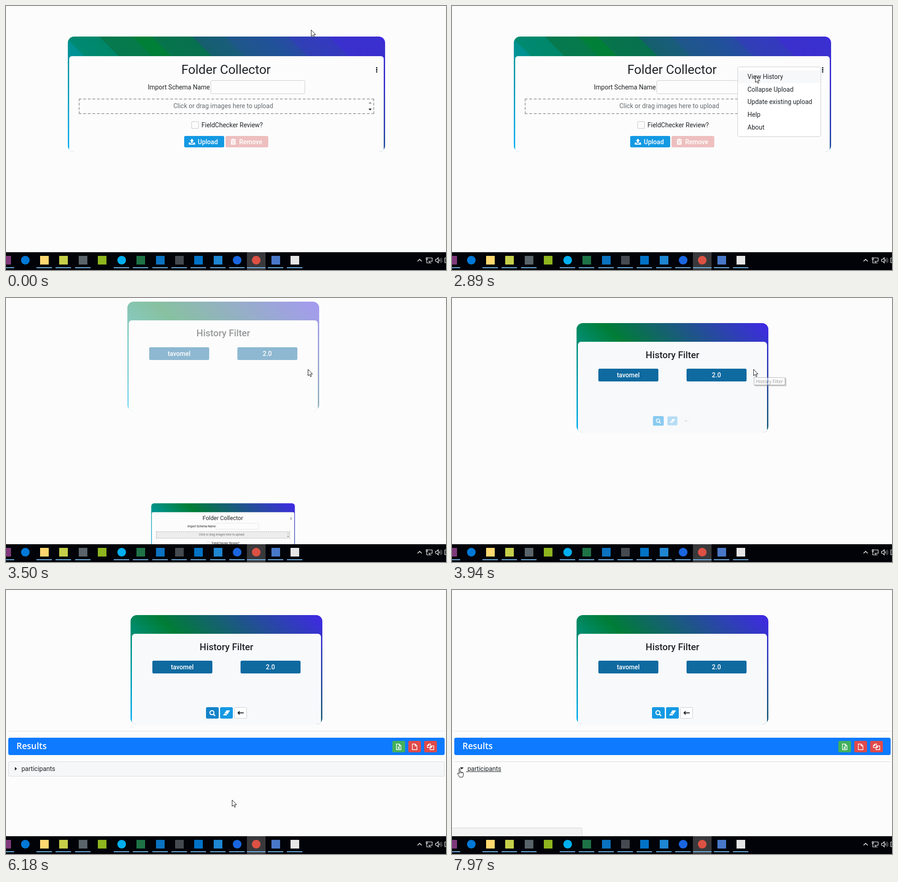
These frames come from a looping animation (968x579 px, 8 s). An HTML page:

```html
<!DOCTYPE html>
<html lang="en">
<head>
<meta charset="utf-8">
<title>Upload history</title>
<style>
html, body { margin: 0; width: 100%; height: 100%; overflow: hidden; background: #fcfcfc; }
#stage { position: absolute; left: 0; top: 0; width: 968px; height: 579px; overflow: hidden;
  background: #fcfcfc; color: #212529; font: 14px Roboto, sans-serif; }
#stage div, #stage svg { position: absolute; box-sizing: border-box; }
.text { white-space: pre; }
.layer { left: 0; top: 0; width: 968px; height: 579px; }
.card { border-radius: 14px; overflow: hidden;
  background: linear-gradient(45deg, #00b0f5, #007d36 45%, #4028e6); }
.banded { background: linear-gradient(45deg, #00b0f5, #00908e 26%, #008a72 26%, #00876a 33.8%,
  #06794f 33.8%, #067a4b 41%, #007f38 42%, #007f38 46%, #07744c 46%, #07704f 55.4%,
  #145f6c 55.4%, #1a5c7c 63%, #1e5788 63%, #21519a 73%, #2849a6 77.5%,
  #2f40b4 77.5%, #3539c0 87%, #3a30cd 87%, #3a2fd0 98.5%, #4028e6 98.5%); }
.btn { border-radius: 3px; }
.white { color: #fff; font-weight: 500; }
</style>
</head>
<body>
<div id="stage"></div>
<script>
const stage = document.getElementById('stage');

function box(parent, x, y, w, h, css = '', cls = '') {
  const d = document.createElement('div');
  d.className = cls;
  d.style.cssText = `left:${x}px;top:${y}px;width:${w}px;height:${h}px;${css}`;
  parent.appendChild(d);
  return d;
}
// Text is centred vertically on cy; with w it is centred in that width too.
function text(parent, x, cy, str, size = 14, css = '', w = 0, cls = '') {
  const d = box(parent, x, cy - size, w || 400, size * 2,
    `font-size:${size}px;line-height:${size * 2}px;${w ? 'text-align:center;' : ''}${css}`, 'text ' + cls);
  d.textContent = str;
  return d;
}
function icon(parent, x, y, w, h, body, view = `0 0 ${w} ${h}`) {
  const d = box(parent, x, y, w, h);
  d.innerHTML = `<svg width="${w}" height="${h}" viewBox="${view}" style="left:0;top:0;overflow:visible">${body}</svg>`;
  return d;
}
function layer() {
  const d = document.createElement('div');
  d.className = 'layer';
  stage.appendChild(d);
  return d;
}
const show = (el, on) => { el.style.visibility = on ? 'inherit' : 'hidden'; };
const clamp = v => Math.max(0, Math.min(1, v));

// Upload page
const upload = layer();
upload.style.transformOrigin = '485px 170px';
const banner = box(upload, 136, 67, 698, 253, '', 'card banded');
box(banner, 3, 43, 692, 212, 'background:#fcfcfc;border-radius:6px 6px 0 0');
text(upload, 284, 140, 'Folder Collector', 28, '', 400);
text(upload, 312, 178, 'Import Schema Name');
box(upload, 450, 163, 208, 30, 'border:1px solid #ccc;border-radius:3px');
const drop = box(upload, 160, 203, 650, 34, 'border:2px dashed #aaa');
text(upload, 278, 219, 'Click or drag images here to upload', 14, 'color:#686c70', 400);
icon(upload, 797, 209, 8, 20, '<path d="M.5 5L4 1.500 7.500 5z" fill="#888"/><path d="M.5 16L4 20 7.500 16z" fill="#222"/>');
box(upload, 408, 253, 16, 16, 'border:1px solid #c4c4c4;border-radius:2px');
text(upload, 430, 261, 'FieldChecker Review?');
box(upload, 392, 285, 88, 25, 'background:#1499e3', 'btn');
icon(upload, 402, 291, 14, 14, '<path d="M7 0L11.500 5H8.800V9.500H5.200V5H2.500zM0 8.500H4V11H10V8.500H14V13H0z" fill="#fff"/>');
text(upload, 422, 298, 'Upload', 14, '', 0, 'white');
box(upload, 483, 285, 94, 25, 'background:#eebfbf', 'btn');
icon(upload, 494, 291, 12, 14, '<path d="M4 0H8V1.500H12V3.500H0V1.500H4zM1 4.500H11V13H1z" fill="#fff"/><path d="M4 6V11M6 6V11M8 6V11" stroke="#eebfbf"/>');
text(upload, 513, 298, 'Remove', 14, '', 0, 'white');
for (const y of [134, 138.3, 142.6]) box(upload, 813.5, y, 3.4, 3.4, 'background:#1d2630;border-radius:1px');

const menu = box(upload, 628, 133, 184, 154, 'background:#fff;border:1px solid #ccc;border-radius:4px');
const hover = box(menu, 0, 7, 182, 27.5, 'background:#f7f8f9');
['View History', 'Collapse Upload', 'Update existing upload', 'Help', 'About']
  .forEach((s, i) => text(menu, 21, 20.8 + i * 27.7, s));

// History page
const history = box(stage, 274, 55, 422, 240);
const frame = box(history, 0, 0, 422, 240, '', 'card');
const panel = box(frame, 3, 41, 416, 200, 'background:#f8f9fb;border-radius:7px 7px 0 0');
text(history, 11, 70, 'History Filter', 20.5, 'font-weight:500', 400);
for (const [x, s] of [[48, 'tavomel'], [242, '2.0']]) {
  box(history, x, 100, 131.5, 28, 'background:#0f6aa0', 'btn');
  text(history, x, 114, s, 14, '', 131.5, 'white');
}
const tools = [166, 197, 228].map((x, i) =>
  box(history, x, 202, 27.5, 25, i < 2 ? 'background:#1499e3' : 'background:#fff;border:1px solid #ccc', 'btn'));
icon(tools[0], 7, 6, 14, 14, '<circle cx="6" cy="6" r="4.400" fill="none" stroke="#fff" stroke-width="2.200"/><path d="M9.300 9.300L13 13" stroke="#fff" stroke-width="2.600"/>');
icon(tools[1], 6, 6, 16, 13, '<path d="M8 1H16L8.500 12H.5z" fill="#fff"/><path d="M3.300 8H7.800L10 11" fill="none" stroke="#1499e3"/>');
icon(tools[2], 6, 6, 14, 11, '<path d="M2 5.500H14M5 2L1.500 5.500 5 9" fill="none" stroke="#1c2227" stroke-width="2"/>');

// Results
const results = layer();
box(results, 5, 309, 960, 1, 'background:#e3e3e3');
box(results, 5, 324, 960, 38, 'background:#0d7aff;border-radius:4px');
text(results, 23, 341.500, 'Results', 19, 'font-family:"Open Sans",sans-serif;font-weight:600;color:#fff');
const page = '<path d="M1 .7H7L11 4.700V13.300H1zM7 .7V4.700H11" fill="none" stroke="#fff" stroke-width="1.400"/>';
const files = [
  ['#43b05c', page + '<path d="M4 6.500L8 11.500M8 6.500L4 11.500" stroke="#fff" stroke-width="1.400"/>'],
  ['#e04a4a', page],
  ['#e04a4a', '<path d="M-1 4L2.500 .7H6V8.500H-1zM2.500 .7V4H-1M5 8L8.500 4.700H13V13.300H5zM8.500 4.700V8H5" fill="none" stroke="#fff" stroke-width="1.400"/>']
];
files.forEach(([c, body], i) => {
  box(results, 850 + i * 35, 331, 28, 25, 'background:' + c, 'btn');
  icon(results, 858 + i * 35, 336.500, 12, 14, body);
});
const row = box(results, 5, 376, 960, 33);
const closed = icon(results, 19, 387, 6, 10, '<path d="M.5 1L5 5 .5 9z" fill="#1c2227"/>');
const opened = icon(results, 17, 388, 9, 6, '<path d="M.5 1H8.500L4.500 5.500z" fill="#1c2227"/>');
const label = text(results, 34, 392, 'participants');
const lead = box(results, 31, 398, 3, 1, 'background:#212529');

const status = box(stage, -1, 521, 288, 20, 'background:#f2f2f2;border:1px solid #d4d4d4;border-radius:0 4px 0 0');

// Tooltips
const tip = box(stage, 404, 285, 101, 24, 'background:#434343;border-radius:3px');
icon(tip, 45, -4, 10, 4, '<path d="M0 4L5 0 10 4z" fill="#434343"/>');
text(tip, 6, 12, 'Search history', 14, 'color:#fff');
const hint = box(stage, 0, 0, 69, 17, 'background:#fff;border:1px solid #8a8a8a;box-shadow:2px 2px 2px #888');
text(hint, 4, 7.500, 'History Filter', 10, 'font-family:"Open Sans",sans-serif;color:#555');

// Taskbar
const bar = box(stage, 0, 540, 968, 39, 'background:#010308');
box(bar, 530, 0, 41, 39, 'background:#39393b');
const apps = [
  [1, '#80397b', 0, 1], [42, '#0078d7', 1, 0], [84, '#ffd870', 0, 1], [126, '#c5cf4a', 0, 1],
  [169, '#59646a', 0, 1], [211, '#8fb51f', 0, 0], [254, '#00aff0', 1, 1], [296, '#1f7246', 0, 1],
  [339, '#0a72c0', 0, 1], [381, '#454a50', 0, 1], [423, '#0072c6', 0, 1], [466, '#1f86d2', 0, 1],
  [508, '#1a66e0', 1, 1], [550, '#dd5144', 1, 1], [593, '#4a78c8', 0, 1], [635, '#e6e6e6', 0, 1]
];
apps.forEach(([x, color, round, running]) => {
  box(bar, x - 9.5, 8, 19, 19, `background:${color};${round ? 'border-radius:50%' : ''}`);
  const half = x === 550 ? 20.5 : 17;
  if (running) box(bar, x - half, 33, half * 2, 2, 'background:#76b9ed');
});
icon(bar, 904, 9, 64, 18, `<g fill="none" stroke="#fff" stroke-width="1.200">
  <path d="M1.500 11L6 6.500 10.500 11" stroke-width="1.500"/>
  <path d="M23 3.500H33.500V11H25M28 11V14M25 14.500H32M20.500 3V7H23V3zM21.700 7V14.500H25"/>
  <path d="M41 6.500H43.500L47 3V14.500L43.500 11H41zM49 6.500Q50.500 8.700 49 11"/>
  <path d="M51 4.500Q54 8.700 51 13M53 3Q57 8.700 53 14.500" stroke="#777"/>
  <path d="M66 3.500H61.500V14H66"/></g>`);

// Pointer
const arrow = icon(stage, 0, 0, 12, 19, '<path d="M.5 .5V14.500L3.700 11.500 5.800 16.500 8 15.600 6 10.800H10.300z" fill="#fff" stroke="#111"/>');
const hand = icon(stage, 0, 0, 15, 20, '<path d="M4.500 12.500V2Q4.500 .6 5.800 .6T7 2V8Q9.300 6.800 9.500 8.500 11.500 7.600 11.700 9.300 14 8.700 14 11V14.500Q14 17 12.500 19.400H5.500Q4.500 16.500 1.200 12.500 .3 10.500 2.500 10.500z" fill="#fff" stroke="#111"/><path d="M7 8V11M9.500 8.500V11M11.700 9.300V11" stroke="#111"/>');

const path = [
  [500, 671, 52], [530, 640, 47], [604, 470, 48], [678, 410, 118], [752, 397, 220],
  [827, 398, 312], [901, 399, 437], [975, 490, 446], [1050, 640, 420], [1124, 773, 400],
  [1198, 740, 385], [1346, 712, 379], [1400, 712, 379], [1495, 671, 368], [1600, 690, 320],
  [1720, 735, 270], [1850, 790, 225], [1950, 815, 205], [2070, 822, 165], [2165, 817, 144],
  [2225, 817, 144], [2306, 813, 141], [2700, 813, 141], [2906, 667, 153], [3180, 667, 153],
  [3275, 664, 156], [3800, 663, 156], [4090, 663, 156], [4530, 443, 263], [5080, 443, 263],
  [5353, 277, 441], [5520, 277, 441], [5797, 497, 460], [6180, 497, 460], [6500, 280, 448],
  [6750, 105, 455], [6985, 58, 429], [7020, 58, 429], [7205, 11, 391], [8000, 11, 391]
];
function pointer(t) {
  let i = path.findIndex(p => p[0] > t);
  if (i === 0) return path[0].slice(1);
  if (i < 0) return path[path.length - 1].slice(1);
  const [a, x, y] = path[i - 1], [b, u, v] = path[i], f = (t - a) / (b - a);
  return [Math.round(x + (u - x) * f), Math.round(y + (v - y) * f)];
}

function draw(time) {
  const step = 74.25;
  const t = 530 + Math.floor((time - 512) / step) * step;
  const [x, y] = pointer(t);

  const leaving = t >= 3180;
  const size = 1 - (t - 3180) * 0.00171;
  show(upload, !leaving || size > 0.02);
  upload.style.transform = leaving ? `translate(-7.5px,327px) scale(${Math.max(size, 0.01)})` : 'none';
  banner.className = leaving ? 'card' : 'card banded';
  drop.style.background = leaving ? '#ededed' : 'none';
  show(menu, t >= 2590 && !leaving);
  show(hover, t >= 2870);

  show(history, leaving);
  history.style.opacity = clamp((t - 3180) / 700);
  const [hx, hy] = t < 3740 ? [267, 7.5] : t < 3810 ? [274, 31] : [274, 55];
  history.style.left = hx + 'px';
  history.style.top = hy + 'px';
  panel.style.background = t < 3740 ? '#fcfcfc' : '#f8f9fb';
  tools.forEach((b, i) => {
    const f = clamp((t - 3848 - i * 40) / 200);
    b.style.opacity = f;
    b.style.transform = `scale(${0.7 + 0.3 * f})`;
  });

  const onSearch = t > 4400 && t < 5110 && x < 468 && y > 250;
  tools[0].style.background = onSearch ? '#0f6aa0' : t >= 4700 && t < 7860 ? '#1283c9' : '#1499e3';
  show(tip, onSearch);
  tip.style.opacity = clamp((t - 4380) / 200);

  const first = t >= 3920 && t < 4100;
  show(hint, first || (t >= 4590 && t < 5110));
  hint.style.opacity = first ? clamp((t - 3850) / 160) : clamp((t - 4450) / 200);
  hint.style.left = x + (first ? 1 : 3) + 'px';
  hint.style.top = y + (first ? 18 : 22) + 'px';

  show(results, t >= 4730);
  const open = t >= 7860;
  const onRow = t >= 4730 && y > 376 && y < 409;
  row.style.border = open ? '0 solid #dcdcdc' : '1px solid #dadada';
  row.style.borderTop = '1px solid #dadada';
  row.style.borderRadius = open ? '0' : '3px';
  row.style.background = open || onRow ? '#fcfcfc' : '#f6f7f8';
  label.style.textDecoration = onRow ? 'underline' : 'none';
  show(lead, onRow);
  show(closed, !open);
  show(opened, open);
  show(status, t >= 7340);

  const pointing = onSearch || onRow || (t >= 2225 && t < 2720);
  show(hand, pointing);
  show(arrow, !pointing);
  for (const c of [hand, arrow]) c.style.transform = `translate(${x}px,${y}px)`;
}

const start = performance.now();
function tick(now) {
  draw(Math.max(0, now - start) % 8000);
  requestAnimationFrame(tick);
}
draw(0);
requestAnimationFrame(tick);
</script>
</body>
</html>
```
